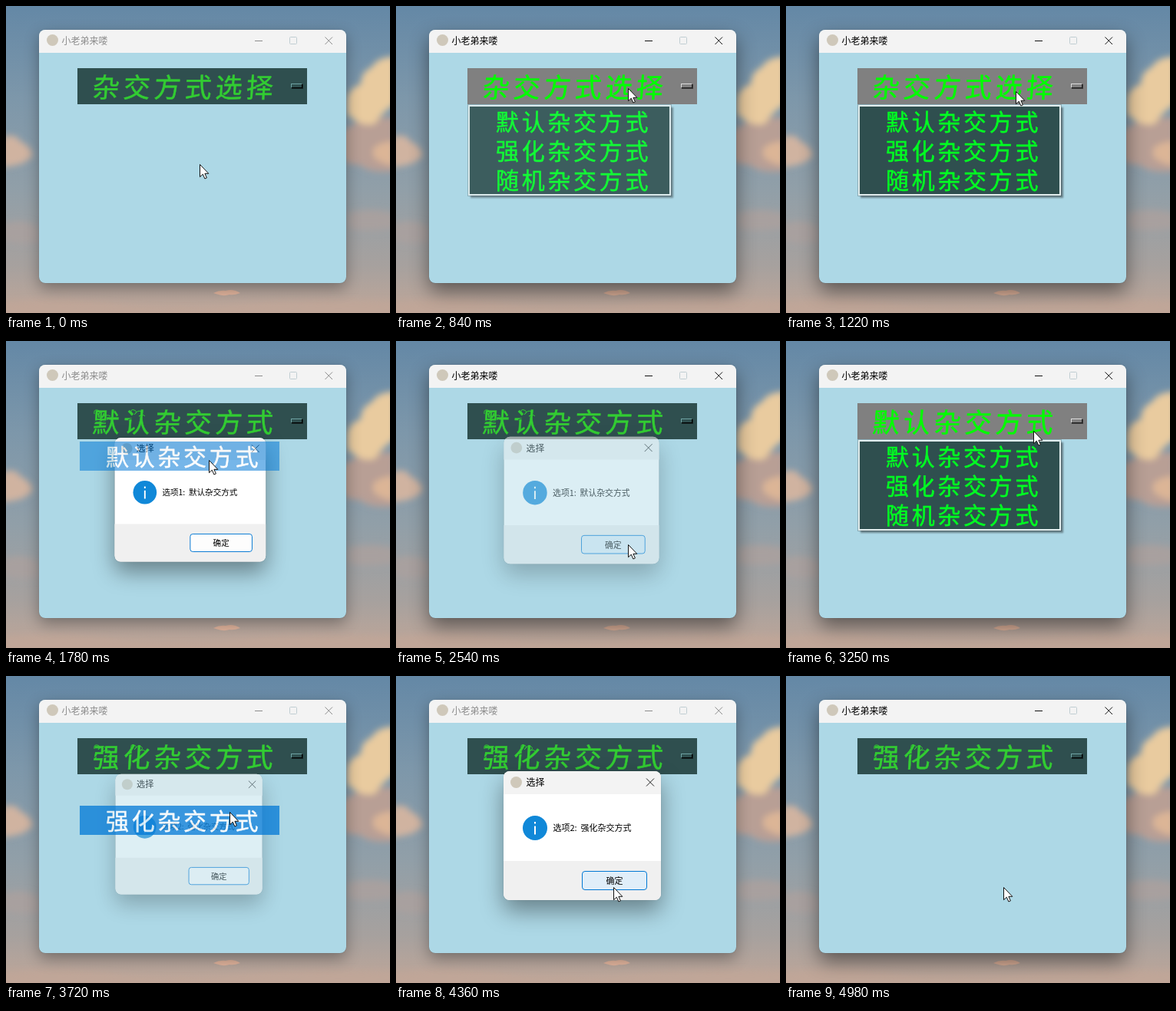
These frames come from a looping animation (500 by 400 pixels, 5.06 s). An HTML page:

```html
<!DOCTYPE html>
<html lang="zh">
<meta charset="utf-8">
<style>
html, body { margin: 0; width: 100%; height: 100%; overflow: hidden; }
body { position: relative; font: 12px "Noto Sans CJK SC", "Noto Sans CJK", sans-serif; }
div, svg { position: absolute; box-sizing: border-box; white-space: pre; }
svg { left: 0; top: 0; overflow: visible; fill: none; }
#win { left: 43px; top: 31px; width: 400px; height: 330px; border-radius: 8px; background: #add8e6;
  box-shadow: 0 0 1px #0006, 0 7px 20px #0005; }
#win.on { box-shadow: 0 0 1px #0008, 0 11px 26px #0007; }
.bar { left: 0; top: 0; width: 100%; height: 30px; border-radius: 8px 8px 0 0; background: #f3f3f3; }
.icon { border-radius: 50%; background: #cfc8ba; }
.title { line-height: 28px; }
#win .title, #win .ctl { color: #8c8c8c; stroke: #8c8c8c; }
#win.on .title, #win.on .ctl { color: #000; stroke: #111; }
#win .title { stroke: none; }
#pick { left: 93px; top: 81px; width: 299px; height: 47px; background: #2f4f4f; color: #32cd32; }
#pick.hot { background: #808080; color: #0f0; }
#label, .item { font-weight: 500; -webkit-text-stroke: .5px; }
#label { left: 20px; top: 0; font-size: 35px; line-height: 45px; letter-spacing: 5px; transform: skewX(-4deg); }
#knob { left: 278px; top: 20px; width: 15px; height: 6px; border: 1px solid; border-color: #6fa3a3 #000 #000 #6fa3a3;
  box-shadow: 1px 1px #0008; }
.hot #knob { border-color: #ddd #222 #222 #ddd; }
#menu { left: 94px; top: 129px; width: 264px; height: 118px; border: 2px solid #e2eeee; background: #2f4f4f;
  box-shadow: 0 0 0 1px #0003, 3px 3px 2px #0006; }
.item { width: 260px; height: 38px; padding-left: 34px; font-size: 30px; line-height: 36px;
  letter-spacing: 3.7px; color: #0f2; }
.item.sel, #ghost { background: #0078d7; color: #fff; }
#box { left: 139.5px; top: 123.5px; width: 205px; height: 168px; border-radius: 8px; background: #fff;
  transform-origin: 18% 33%; box-shadow: 0 0 1px #0006, 0 14px 30px #0006; }
#foot { left: 0; top: 117px; width: 100%; height: 51px; border-radius: 0 0 8px 8px; background: #f0f0f0; }
#ok { left: 102px; top: 130px; width: 85px; height: 25px; border: 1.5px solid #0078d4; border-radius: 4px;
  background: #fdfdfd; font-size: 11px; line-height: 22px; text-align: center; }
#ok.hot { background: #e0eef9; }
#info { left: 24.5px; top: 58px; width: 32px; height: 32px; border-radius: 50%; background: #1088d8; }
#msg { left: 64.5px; top: 64px; font-size: 11px; line-height: 18px; }
#dot { width: 24px; height: 24px; margin: -12px 0 0 -13px; border-radius: 50%; background: #b4c814; opacity: .9; }
</style>
<body>
<svg width="500" height="400">
  <defs>
    <linearGradient id="air" x2="0" y2="1">
      <stop stop-color="#6488a6"/><stop offset=".3" stop-color="#7d97aa"/>
      <stop offset=".6" stop-color="#919fa8"/><stop offset=".85" stop-color="#a7a19e"/>
      <stop offset="1" stop-color="#bfa698"/>
    </linearGradient>
    <filter id="soft"><feGaussianBlur stdDeviation="4"/></filter>
  </defs>
  <path fill="url(#air)" d="M0 0h500v400H0z"/>
  <g filter="url(#soft)">
    <path fill="#b89f95" d="M436 165q20-20 70-20v70q-30 4-46-8q-18 0-24-10z"/>
    <path fill="#e9cb9f" d="M444 120q4-14 18-18q0-16 14-22q8-14 30-14v62q-16 10-26 26q-20 4-36-14z"/>
    <path fill="#dcb596" d="M478 186q10-10 28-10v32q-18-2-28-12z"/>
    <path fill="#d0b3a0" d="M-6 172q18-8 24 4q14 6 17 18q-8 14-41 16z"/>
    <path fill="#a8a09f" d="M-6 285q30-10 50 4v20q-30 4-50-4zM444 270q26-8 62 0v20q-40 6-62 0z"/>
    <path fill="#c0a698" d="M-6 388q70-10 150 2t150 2t212-6v24H-6z"/>
  </g>
  <path fill="#dfb29b" d="M270 374q8-4 16-3q10-3 19 3q-8 3-14 2q-8 3-21-2z"/>
</svg>

<div id="win">
  <div class="bar"></div>
  <div class="icon" style="left:10px;top:6px;width:15px;height:15px"></div>
  <div class="title" style="left:29.5px;top:0">小老弟来喽</div>
  <svg class="ctl" width="400" height="30">
    <path d="M281 14.500h10M372.500 9.500l9.500 9.500m0-9.500l-9.500 9.500"/>
    <rect x="326.500" y="9.500" width="9" height="9" rx="1" stroke="#c0cdd2"/>
  </svg>
</div>

<div id="pick">
  <div id="label"></div>
  <svg id="curl" width="100" height="47" stroke="#32cd32">
    <path d="M22 14q-1-6 4-5t1 6q6-7 9-3t-5 6q8-4 12-1M70 13q-1-6 4-4t0 6q5-7 9-4t-3 6q6-3 8 0"/>
    <path stroke="#2f4f4f" d="M22 26q4-6 9-2t10-3M66 22q6-4 8 2"/>
  </svg>
  <div id="knob"></div>
</div>

<div id="menu"></div>

<div id="box">
  <div class="bar"></div>
  <div class="icon" style="left:9px;top:7px;width:15px;height:15px"></div>
  <div class="title" style="left:29.5px;top:0">选择</div>
  <svg width="205" height="30" stroke="#222"><path d="M186 9.500l10 10m0-10l-10 10"/></svg>
  <div id="info"><svg width="32" height="32" stroke="#fff" stroke-width="2"><path d="M16 13.500v11M16 8v2.500"/></svg></div>
  <div id="msg"></div>
  <div id="foot"></div>
  <div id="ok">确定</div>
</div>

<div id="ghost" class="item"></div>
<div id="dot"></div>
<svg id="cursor" width="13" height="20">
  <path fill="#fff" stroke="#111" stroke-linejoin="round"
    d="M.5.5v16.200l3.800-3.500l2.600 5.800l2.500-1.100l-2.500-5.600h4.900z"/>
</svg>

<script>
const LOOP = 5060, FADE = 180;
const names = ["默认杂交方式", "强化杂交方式", "随机杂交方式"];
// One round per menu choice: menu opens, dialog opens, dialog closes.
const rounds = [{ menu: 680, open: 1650, close: 2480 }, { menu: 2930, open: 3650, close: 4430 }];
const clicks = [640, 1600, 2410, 2910, 3590, 4370];
const path = [
  [70, 252, 206], [520, 302, 107], [1140, 302, 107], [1580, 264, 155], [1900, 264, 155],
  [2400, 302, 265], [2600, 302, 265], [2860, 331, 98], [3100, 331, 98], [3580, 291, 177],
  [3850, 291, 177], [4330, 283, 275], [LOOP, 283, 275]
];

const $ = id => document.getElementById(id);
const clamp = v => Math.max(0, Math.min(1, v));
const within = (v, a, b) => v >= a && v < b;
const show = (el, alpha) => { el.style.opacity = alpha; };
const place = (el, x, y) => { el.style.left = x + "px"; el.style.top = y + "px"; };

const items = names.map((name, i) => {
  const el = document.createElement("div");
  el.className = "item";
  el.textContent = name;
  place(el, 0, i * 38);
  $("menu").append(el);
  return el;
});

function pointer(t) {
  const i = path.findIndex(p => p[0] > t);
  if (i < 1) return path[0].slice(1);
  const [t0, x0, y0] = path[i - 1], [t1, x1, y1] = path[i];
  const p = (t - t0) / (t1 - t0), e = p * p * (3 - 2 * p);
  return [x0 + (x1 - x0) * e, y0 + (y1 - y0) * e];
}

function draw(t) {
  const [x, y] = pointer(t);
  const n = t < rounds[1].menu ? 0 : 1, r = rounds[n];
  const menuOn = within(t, r.menu, r.open), modal = within(t, r.open, r.close);
  const chosen = t < rounds[0].open ? -1 : t < rounds[1].open ? 0 : 1;
  const hot = menuOn || !modal && within(x, 93, 392) && within(y, 81, 128);

  place($("cursor"), x, y);
  place($("dot"), x, y);
  $("dot").hidden = !clicks.some(c => within(t, c, c + 110));

  $("win").classList.toggle("on", t >= clicks[0] && !modal);
  $("pick").classList.toggle("hot", hot);
  $("label").textContent = chosen < 0 ? "杂交方式选择" : names[chosen];
  show($("curl"), chosen < 0 || hot ? 0 : 1);

  show($("menu"), menuOn ? clamp((t - r.menu) / FADE) : 0);
  items.forEach((el, i) => el.classList.toggle("sel",
    within(x, 96, 356) && within(y, 131 + i * 38, 169 + i * 38)));

  const age = t - r.open, left = t - r.close;
  show($("ghost"), age < 0 ? 0 : clamp(1 - age / 280));
  $("ghost").textContent = names[n];
  place($("ghost"), 96, 131 + n * 38);

  show($("box"), left > 0 ? clamp(1 - left / 140) : clamp(age / 120));
  const scale = left > 0 ? 1 - left / 4000 : .9 + .1 * clamp(age / 220);
  $("box").style.transform = `scale(${scale})`;
  $("msg").textContent = `选项${n + 1}:  ${names[n]}`;
  $("ok").classList.toggle("hot", within(x, 241, 327) && within(y, 253, 279));
}

const start = performance.now();
function tick() {
  draw((performance.now() - start) % LOOP);
  requestAnimationFrame(tick);
}
tick();
</script>
</body>
</html>
```
